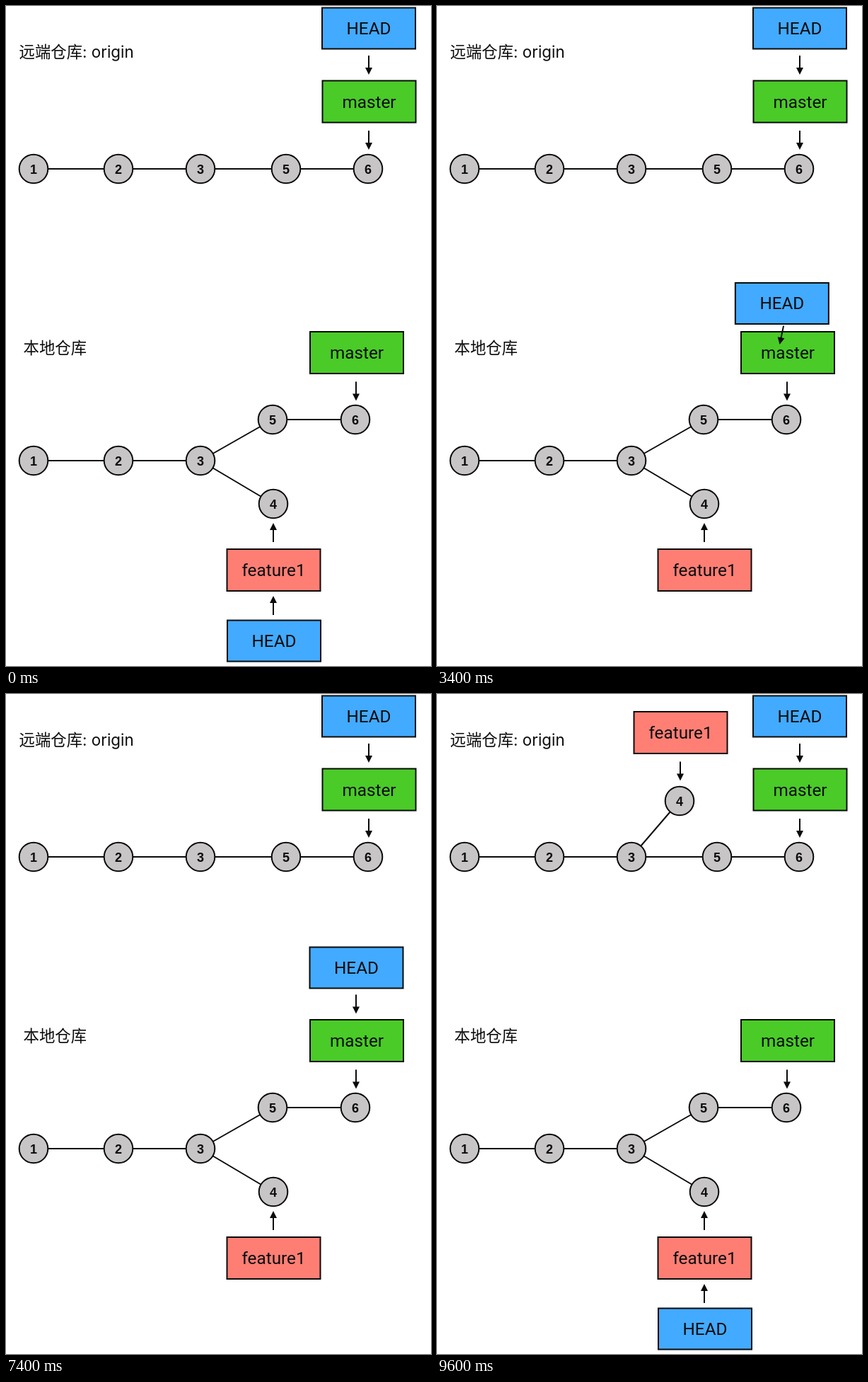
Write an HTML page that moves like this. It is 601 px wide and 932 px high and loops after 9800 ms.

```html
<!DOCTYPE html>
<html lang="zh-CN">
<head>
<meta charset="utf-8">
<title>Pushing a branch</title>
<style>
  html, body { margin: 0; width: 100%; height: 100%; overflow: hidden; background: #fff; }
  svg { display: block; width: 601px; height: 932px; }
  text { fill: #0c0c0c; text-anchor: middle; }
  .tag text { font: 24.3px Roboto, sans-serif; }
  .tag rect { stroke: #0a0a0a; stroke-width: 2; }
  .node text { font: bold 18px "Liberation Sans", Arial, sans-serif; }
  .node circle { fill: #c8c5c6; stroke: #0a0a0a; stroke-width: 2; }
  .link, .arrow line { stroke: #0a0a0a; stroke-width: 2; }
  .arrow path { fill: #0a0a0a; }
  .title { font: 22.4px Inter, "Noto Sans CJK SC", "Noto Sans CJK", sans-serif; text-anchor: start; }
</style>
</head>
<body>
<svg id="stage" viewBox="0 0 601 932"></svg>
<script>
const LOOP = 9800, STEP = 200;
const CYCLE = 4265, CYCLE_START = 2235;
const MOVE_AT = 1000, PUSH_AT = 2150, DURATION = 1000;
const BLUE = '#42aaff', GREEN = '#4acb28', RED = '#ff7e74';

const tag = (label, x, y, color, h = 59, id = '') => `
  <g class="tag" id="${id}" transform="translate(${x} ${y})">
    <rect x="-66" y="${-h / 2}" width="132" height="${h}" fill="${color}"/>
    <text y="8.5">${label}</text>
  </g>`;
const node = (n, x, y) => `
  <g class="node" transform="translate(${x} ${y})">
    <circle r="20.3"/><text y="6.5">${n}</text>
  </g>`;
const link = (x1, y1, x2, y2) =>
  `<line class="link" x1="${x1}" y1="${y1}" x2="${x2}" y2="${y2}"/>`;
const arrow = (x, y, turn = 0, id = '') => `
  <g class="arrow" id="${id}" transform="translate(${x} ${y}) rotate(${turn})">
    <line y1="-13.5" y2="6"/><path d="M-5 3.5H5L0 13.5Z"/>
  </g>`;
const title = (s, x, y) => `<text class="title" x="${x}" y="${y}">${s}</text>`;

const remote = title('远端仓库: origin', 18.5, 73) +
  link(39, 230, 512, 230) +
  `<g id="pushed">${link(275, 230, 343, 151)}${node(4, 343, 151)}
    ${tag('feature1', 344.5, 54.5, RED)}${arrow(344, 109)}</g>` +
  [[1, 39], [2, 159], [3, 275], [5, 396], [6, 512]].map(([n, x]) => node(n, x, 230)).join('') +
  tag('HEAD', 513, 31.5, BLUE, 58) + arrow(513, 83.5) +
  tag('master', 513.5, 135, GREEN) + arrow(513, 189.5);

const local = title('本地仓库', 24.5, 490.5) +
  link(39, 642, 275, 642) + link(275, 642, 377, 584) +
  link(377, 584, 494, 584) + link(275, 642, 378, 703) +
  [[1, 39, 642], [2, 159, 642], [3, 275, 642], [4, 378, 703], [5, 377, 584], [6, 494, 584]]
    .map(n => node(...n)).join('') +
  tag('master', 496, 489.5, GREEN) + arrow(495, 544) +
  tag('feature1', 378.5, 796.5, RED) + arrow(378, 743.5, 180) +
  tag('HEAD', 0, 0, BLUE, 58, 'head') + arrow(0, 0, 0, 'pointer');

document.getElementById('stage').innerHTML = remote + local;

const head = document.getElementById('head');
const pointer = document.getElementById('pointer');
const pushed = document.getElementById('pushed');

const mix = (a, b, p) => a + (b - a) * p;
const ease = u => (1 - Math.cos(Math.PI * Math.min(1, Math.max(0, u)))) / 2;

function draw(time) {
  const t = Math.floor((time % LOOP) / STEP) * STEP;
  const phase = (t - CYCLE_START + CYCLE) % CYCLE;
  const p = ease((phase - MOVE_AT) / DURATION);
  head.setAttribute('transform', `translate(${mix(495.5, 379, p)} ${mix(386.5, 896.5, p)})`);
  pointer.setAttribute('transform',
    `translate(${mix(495, 378, p)} ${mix(438, 846.5, p)}) rotate(${180 * p})`);
  pushed.setAttribute('opacity', ease((phase - PUSH_AT) / DURATION));
}

const start = performance.now();
function tick() {
  draw(performance.now() - start);
  requestAnimationFrame(tick);
}
tick();
</script>
</body>
</html>
```
